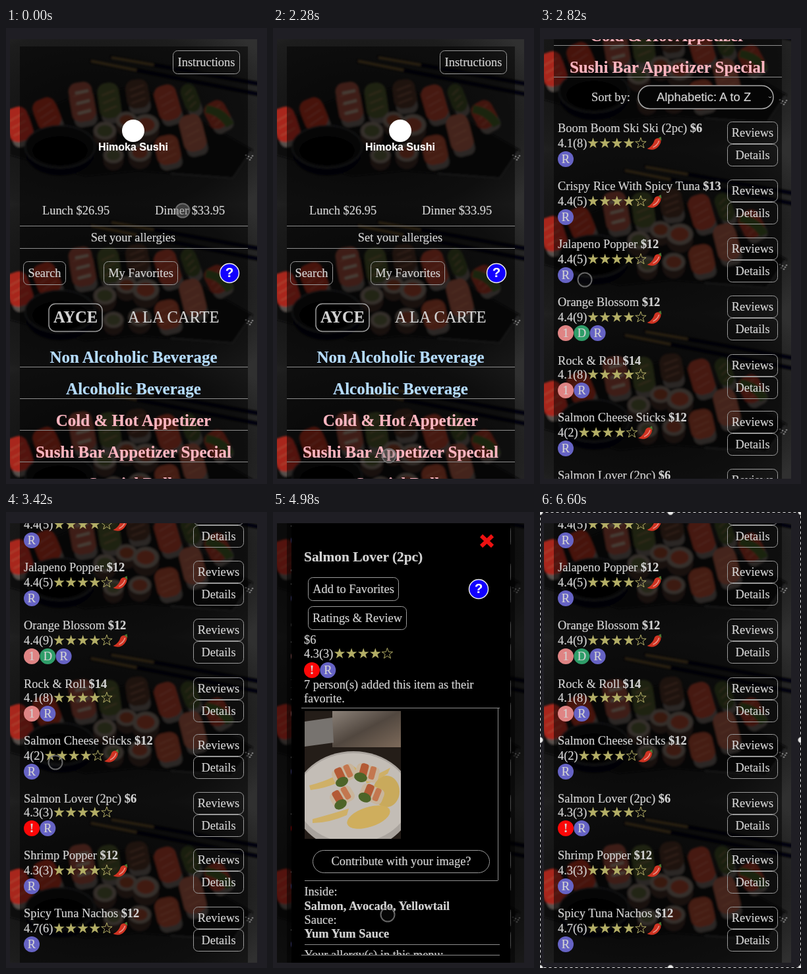
Recreate the animation shown at these times as an HTML page. Size 396 by 692 pixels, loop 6.66 s.

```html
<!DOCTYPE html>
<html lang="en">
<head>
<meta charset="utf-8">
<title>Sushi menu</title>
<style>
html, body { margin: 0; width: 100%; height: 100%; overflow: hidden; background: #1f1e24; }
svg { display: block; width: 396px; height: 692px; }
text { font-family: "Liberation Serif", "Times New Roman", serif; color: #d3d3d3; fill: currentColor; stroke: currentColor; stroke-width: .2px; white-space: pre; }
.bold { font-weight: bold; }
.sans { font-family: "Liberation Sans", Arial, sans-serif; }
.line { stroke: #8c8c8c; stroke-width: 1; }
.box { fill: none; stroke: #9a9a9a; stroke-width: 1; }
</style>
</head>
<body>
<svg id="stage" viewBox="0 0 396 692"></svg>
<script>
const LOOP = 6660, STEP = 60;
const BLUE = '#b5dcff', PINK = '#ffb6c1';

// Drawing helpers; text is placed by its visual middle
const text = (x, y, s, { size = 18.4, cls = '', color = '', mid = false } = {}) =>
  `<text x="${x}" y="${Math.round(y + size * 0.32)}" class="${cls}" text-anchor="${mid ? 'middle' : 'start'}"
    style="font-size:${size}px;${color && 'color:' + color}">${s}</text>`;
const line = (x1, x2, y) => `<path class="line" d="M${x1} ${y + .5}H${x2}"/>`;
const rect = (x, y, w, h, fill, extra = '') => `<rect x="${x}" y="${y}" width="${w}" height="${h}" fill="${fill}" ${extra}/>`;
const ellipse = (x, y, rx, ry, fill, extra = '') => `<ellipse cx="${x}" cy="${y}" rx="${rx}" ry="${ry}" fill="${fill}" ${extra}/>`;
const path = (d, fill, extra = '') => `<path d="${d}" fill="${fill}" ${extra}/>`;
const button = (x1, x2, y, h, label, r = 7) =>
  `<rect class="box" x="${x1 + .5}" y="${y + .5}" width="${x2 - x1 - 1}" height="${h - 1}" rx="${r}"/>` +
  text((x1 + x2) / 2, y + h / 2, label, { mid: true });
const help = (x, y) => ellipse(x, y, 14.5, 14.5, '#1200ff', 'stroke="#eee" stroke-width="1.5"') +
  text(x, y, '?', { size: 20, cls: 'sans bold', color: '#fff', mid: true });

function star(x, y, full) {
  const points = Array.from({ length: 10 }, (_, i) => {
    const r = i % 2 ? 3.4 : 8.6, a = i * Math.PI / 5;
    return (x + r * Math.sin(a)).toFixed(1) + ',' + (y - r * Math.cos(a)).toFixed(1);
  }).join(' ');
  return `<polygon points="${points}" fill="${full ? '#b3ae66' : 'none'}" stroke="#b3ae66" stroke-width="${full ? 0 : 1}"/>`;
}
const chili = (x, y) => `<g transform="translate(${x} ${y})">` +
  path('M21 -4C20 -9 13 -9 11 -4C9 2 5 6 0 8C6 11 13 10 17 5C19 2 21 0 21 -4Z', '#cf3322') +
  path('M18 -4Q16 3 9 6', 'none', 'stroke="#e9968a" stroke-width="1.5"') +
  path('M17 -8L21 -10L22 -4Z', '#4f7a35') + '</g>';
const rating = (x, y, label, width, spicy) => text(x, y, label) +
  [0, 1, 2, 3, 4].map(i => star(x + width + 9 + i * 18.1, y, i < 4)).join('') +
  (spicy ? chili(x + width + 91, y) : '');
const badgeColors = { R: '#6663c4', D: '#2f9d69', 1: '#df8484', '!': '#fb0808' };
const badges = (x, y, letters) => [...letters].map((c, i) =>
  ellipse(x + 12 + i * 24.3, y, 12, 12, badgeColors[c]) +
  text(x + 12 + i * 24.3, y, c, { mid: true, cls: c === '!' ? 'bold' : '' })).join('');

// Repeating backdrop, 250 px tall
const nigiri = (x, y, w, h, turn, color) => `<g transform="translate(${x} ${y}) rotate(${turn})">` +
  rect(-w / 2 + 2, -h / 2 + 12, w - 2, h - 10, '#57504b', 'rx="10"') +
  rect(-w / 2, -h / 2, w, h - 6, color, 'rx="13"') +
  [.3, .5, .7].map(k => path(`M${-w / 2 + 6} ${-h / 2 + h * k}l${w - 12} -5`, 'none', 'stroke="#b3745f" stroke-opacity=".35" stroke-width="2"')).join('') + '</g>';
const maki = (x, y, r, color) => ellipse(x, y + 8, r, r, '#33241d') + ellipse(x, y, r, r * .8, '#6b5f57') +
  ellipse(x, y, r * .68, r * .52, color);
const tile =
  rect(0, 0, 396, 251, 'url(#stone)') + '<g filter="url(#soft)">' +
  path('M6 128L95 90L200 70L375 168L343 212L200 200L120 208L6 176Z', '#0a0a0c') +
  path('M372 170L344 211L250 204', 'none', 'stroke="#303030" stroke-width="2"') +
  path('M127 33L396 86M158 27L396 70', 'none', 'stroke="#060607" stroke-width="6"') +
  path('M129 33L198 47M160 28L224 39', 'none', 'stroke="#4f3d22" stroke-width="4"') +
  nigiri(20, 132, 36, 58, -18, '#a8281a') + nigiri(63, 116, 36, 54, -22, '#8f2519') +
  nigiri(116, 98, 36, 66, -10, '#7c3a2d') + path('M105 82l20 -4M107 98l20 -5M109 113l20 -5', 'none', 'stroke="#8d7a6c" stroke-width="4"') +
  nigiri(157, 96, 32, 60, -8, '#3d4520') + nigiri(200, 86, 34, 50, -8, '#3d251b') +
  nigiri(246, 99, 34, 60, -16, '#8d3323') + nigiri(281, 92, 24, 50, -20, '#303d1b') +
  nigiri(322, 117, 34, 48, -28, '#84291c') + path('M304 100Q334 104 346 128L334 134Q322 115 302 112Z', '#35481f') +
  nigiri(284, 145, 34, 62, -14, '#8a4a37') +
  maki(150, 139, 17, '#454b2a') + maki(183, 123, 16, '#71301f') + maki(212, 130, 20, '#823422') +
  maki(163, 176, 15, '#4b5030') + maki(203, 172, 17, '#793424') + nigiri(246, 171, 36, 50, -12, '#8c3a26') +
  ellipse(82, 171, 53, 36, '#060607') + ellipse(82, 163, 53, 32, '#0c0c0f', 'stroke="#252628" stroke-width="2"') +
  ellipse(82, 169, 42, 22, '#040404') + '</g>' +
  [0, 1, 2, 3, 4, 5].map(i => ellipse(364 + i * 2, 176 + (i * 5) % 8, 1.5, 1.2, '#777')).join('');

const heading = (y, label, color) => text(193.5, y, label, { size: 25, cls: 'bold', color, mid: true }) + line(21, 367, y + 14);

const dishes = [
  ['Boom Boom Ski Ski (2pc)', 6, '4.1(8)', 1, 'R'],
  ['Crispy Rice With Spicy Tuna', 13, '4.4(5)', 1, 'R'],
  ['Jalapeno Popper', 12, '4.4(5)', 1, 'R'],
  ['Orange Blossom', 12, '4.4(9)', 1, '1DR'],
  ['Rock &amp; Roll', 14, '4.1(8)', 0, '1R'],
  ['Salmon Cheese Sticks', 12, '4(2)', 1, 'R'],
  ['Salmon Lover (2pc)', 6, '4.3(3)', 0, '!R'],
  ['Shrimp Popper', 12, '4.3(3)', 1, 'R'],
  ['Spicy Tuna Nachos', 12, '4.7(6)', 1, 'R'],
];
let rowY = 735.8;
const dishRows = dishes.map(([name, price, score, spicy, marks]) => {
  const y = Math.round(rowY), drop = spicy ? 0 : 2;
  rowY += 88.2 - drop;
  return text(27, y, `${name} <tspan class="bold">$${price}</tspan>`) +
    rating(27, y + 23 - drop, score, score.length > 4 ? 44.5 : 31, spicy) +
    badges(27, y + 47 - drop, marks) +
    button(284, 361, y - 10, 34, 'Reviews') + button(284, 361, y + 24, 34, 'Details');
}).join('');

const page =
  [0, 1, 2, 3, 4, 5, 6].map(i => `<use href="#tile" y="${17 + i * 250}"/>`).join('') +
  rect(21, 28, 346, 1700, '#000', 'opacity=".5"') +
  button(253, 355, 34, 36, 'Instructions') +
  ellipse(193, 156, 17, 17, '#fff') +
  text(193, 181, 'Himoka Sushi', { size: 16, cls: 'sans bold', color: '#fff', mid: true }) +
  text(55, 277, 'Lunch $26.95') + text(226, 277, 'Dinner $33.95') + line(21, 367, 300) +
  text(193, 318, 'Set your allergies', { mid: true }) + line(21, 367, 334) +
  button(26, 91, 354, 36, 'Search') + button(148, 261, 354, 36, 'My Favorites') + help(339, 372) +
  `<rect class="box" x="65" y="418.5" width="81" height="42" rx="10" style="stroke-width:1.5"/>` +
  text(105.5, 439, 'AYCE', { size: 24.5, cls: 'bold', mid: true }) +
  text(254, 439, 'A LA CARTE', { size: 24.5, mid: true }) +
  heading(500, 'Non Alcoholic Beverage', BLUE) + heading(548, 'Alcoholic Beverage', BLUE) +
  heading(596, 'Cold &amp; Hot Appetizer', PINK) + heading(644, 'Sushi Bar Appetizer Special', PINK) +
  `<g id="closed">${heading(692, 'Special Rolls', PINK)}</g><g id="open">` +
  text(78, 689, 'Sort by:') +
  `<rect x="149" y="671.5" width="205" height="35" rx="17.5" fill="#050505" stroke="#aaa" stroke-width="1.5"/>` +
  text(177, 689, 'Alphabetic: A to Z', { cls: 'sans' }) + path('M347 688l2 2l2 -2', 'none', 'stroke="#aaa"') +
  dishRows + '</g>';

const allergies = ['Albacore', 'Assorted Fish', 'Avocado', 'Bacon', 'Bean Curd ( Inari ) Tempura', 'Buffalo Sauce',
  'Cajun Albacore', 'Calamari', 'Calamari Tempura', 'California Deep Fried', 'California Roll', 'Chicken Cutlet',
  'Chili Mayo', 'Chili Sauce', 'Chilly', 'Coconut Flake', 'Coconut Shrimp Tempura', 'Cooked Salmon'];
const allergyDialog = rect(28, 85, 332, 530, '#000') +
  text(47, 138, 'Choose your allergy', { size: 21.4, cls: 'bold' }) +
  text(47.5, 182, 'Allergy chosen:<tspan id="chosen"> Avocado</tspan>') + line(43, 344, 196) +
  `<g clip-path="url(#listClip)">${allergies.map((a, i) => text(47.5, 211 + i * 21, a)).join('')}</g>` +
  path('M341.5 198V251', 'none', 'class="line"') + line(43, 344, 571) + text(47, 586, 'Done');

const roll = (x, y, turn) => `<g transform="translate(${x} ${y}) rotate(${turn})">` +
  rect(-18, -12, 36, 24, '#c8b59c', 'rx="7"') + rect(-12, -13, 12, 22, '#b35a35', 'rx="4"') +
  rect(3, -12, 9, 20, '#c3774f', 'rx="3"') + ellipse(-8, 9, 10, 7, '#4d6428') + '</g>';
const photo = rect(48, 302, 146, 195, '#241d18') +
  rect(90, 302, 104, 55, 'url(#tray)') + path('M48 318L90 312L92 350L48 356Z', '#77736f') +
  ellipse(122, 438, 90, 75, '#a9a39d') + ellipse(122, 434, 86, 68, '#c3bdb6') +
  ellipse(172, 424, 20, 24, '#c9aa5c') + ellipse(145, 463, 34, 15, '#cfae5d', 'transform="rotate(-18 145 463)"') +
  path('M55 415Q95 405 120 384L128 390Q100 417 57 422ZM60 466Q90 458 115 450L112 460Q85 472 60 472ZM140 405Q160 398 178 388L174 397Q158 408 142 412Z', '#cfb067') +
  roll(108, 398, -25) + roll(143, 396, 15) + roll(105, 432, -30) + roll(150, 428, 22);

const dishDialog = rect(28, 17, 332, 667, '#000') +
  path('M316 36L333 52M333 36L316 52', 'none', 'stroke="#ee1111" stroke-width="6"') +
  text(47, 68, 'Salmon Lover (2pc)', { size: 21.4, cls: 'bold' }) +
  button(53, 191, 99, 36, 'Add to Favorites') + help(312, 117) + button(53, 203, 143, 36, 'Ratings &amp; Review') +
  text(47, 194, '$6') + rating(47, 215, '4.3(3)', 45, 0) + badges(47, 240, '!R') +
  text(47, 262, '7 person(s) added this item as their') + text(47, 283, 'favorite.') + line(43, 344, 297) +
  '<g clip-path="url(#bodyClip)"><g id="body">' +
  `<g clip-path="url(#photoClip)">${photo}</g>` +
  button(60, 329, 513, 35, 'Contribute with your image?', 17) + line(48, 341, 559) +
  text(47.5, 576, 'Inside:') + text(47.5, 598, 'Salmon, Avocado, Yellowtail', { cls: 'bold' }) +
  text(47.5, 619, 'Sauce:') + text(47.5, 640, 'Yum Yum Sauce', { cls: 'bold' }) + line(48, 344, 656) +
  text(47.5, 672, 'Your allergy(s) in this menu:') + text(47.5, 693, 'Avocado', { cls: 'bold' }) +
  '</g><path id="thumb" class="line" d="M341.5 298V559"/></g>' + line(43, 344, 672);

const handles = [0, 198, 396].flatMap(x => [0, 346, 692].map(y => x === 198 && y === 346 ? '' :
  ellipse(x, y, 4.5, 4.5, '#e8e8e8', 'stroke="#777"'))).join('');

const clip = (id, x, y, w, h) => `<clipPath id="${id}"><rect x="${x}" y="${y}" width="${w}" height="${h}"/></clipPath>`;
document.getElementById('stage').innerHTML = `<defs>
  <radialGradient id="stone" cx=".35" cy=".5" r=".75"><stop offset=".3" stop-color="#131313"/><stop offset=".75" stop-color="#1d1d1d"/><stop offset="1" stop-color="#303030"/></radialGradient>
  <linearGradient id="tray" x2="1" y2="1"><stop stop-color="#8b8178"/><stop offset=".5" stop-color="#51473f"/><stop offset="1" stop-color="#7d6a5a"/></linearGradient>
  <filter id="soft"><feGaussianBlur stdDeviation="1.8"/></filter>
  ${clip('pageClip', 6, 17, 375, 667)}${clip('listClip', 28, 198, 332, 373)}${clip('bodyClip', 28, 298, 332, 374)}
  <clipPath id="photoClip"><rect id="reveal" y="302" height="194"/></clipPath>
  <g id="tile">${tile}</g></defs>
  ${rect(0, 0, 396, 692, '#1f1e24')}
  <g clip-path="url(#pageClip)"><g id="page">${page}</g>
  <rect id="shade" x="6" y="17" width="375" height="667" opacity=".5"/>
  <g id="allergyDialog">${allergyDialog}</g><g id="dishDialog">${dishDialog}</g></g>
  <circle id="cursor" r="10.5" fill="#777" stroke="#777" stroke-opacity=".85" stroke-width="2"/>
  <g id="selection"><rect x=".5" y=".5" width="395" height="691" fill="none" stroke="#111"/>
  <rect x=".5" y=".5" width="395" height="691" fill="none" stroke="#ddd" stroke-dasharray="4 4"/>${handles}</g>`;

const el = id => document.getElementById(id);
const show = (id, on) => el(id).setAttribute('display', on ? 'inline' : 'none');
const ease = p => p * p * (3 - 2 * p);

// Each key is [time, ...values]
function track(keys, t) {
  const i = keys.findIndex(k => k[0] > t);
  if (i < 0) return keys[keys.length - 1].slice(1);
  if (i === 0) return keys[0].slice(1);
  const a = keys[i - 1], b = keys[i], p = ease((t - a[0]) / (b[0] - a[0]));
  return a.slice(1).map((v, n) => v + (b[n + 1] - v) * p);
}

// The touch pointer drags the list and the dialog body along with it
const cursorKeys = [[0, 268, 277], [360, 193, 318], [540, 193, 318], [900, 58, 253], [1020, 58, 253], [1500, 62, 586],
  [1680, 62, 586], [2160, 176, 649], [2340, 176, 649], [2820, 68, 382], [3000, 70, 624], [3420, 75, 380], [3540, 75, 435],
  [3720, 75, 435], [4080, 49, 340], [4920, 174, 611], [4980, 174, 611], [5280, 174, 571], [5400, 174, 571],
  [5700, 174, 611], [6300, 324, 46]];
const scrollKeys = [[2340, 0], [2760, 584], [3000, 584], [3420, 828]];
const bodyKeys = [[4980, 0], [5280, 40], [5400, 40], [5700, 0]];
const photoKeys = [[3900, 194], [4320, 48]];
const clicks = [0, 480, 960, 1620, 2280, 3660, 6480];

function render(t) {
  const [x, y] = track(cursorKeys, t), [left] = track(photoKeys, t);
  const scroll = Math.round(track(scrollKeys, t)[0]), body = Math.round(track(bodyKeys, t)[0]);
  const choosing = t >= 540 && t < 1680, viewing = t >= 3720 && t < 6540;
  el('page').setAttribute('transform', `translate(0 ${-scroll})`);
  show('closed', t < 2340);
  show('open', t >= 2340);
  show('shade', choosing || viewing);
  show('allergyDialog', choosing);
  show('chosen', t >= 1020);
  show('dishDialog', viewing);
  el('body').setAttribute('transform', `translate(0 ${-body})`);
  el('thumb').setAttribute('transform', `translate(0 ${body * .7})`);
  el('reveal').setAttribute('x', left);
  el('reveal').setAttribute('width', 194 - left);
  el('cursor').setAttribute('transform', `translate(${x} ${y})`);
  el('cursor').setAttribute('fill-opacity', clicks.some(c => Math.abs(t - c) <= 60) ? .45 : .05);
  show('cursor', t < 6540);
  show('selection', t >= 6600);
}

const start = performance.now();
function tick() {
  render(Math.floor((performance.now() - start) % LOOP / STEP) * STEP);
  requestAnimationFrame(tick);
}
tick();
</script>
</body>
</html>
```
